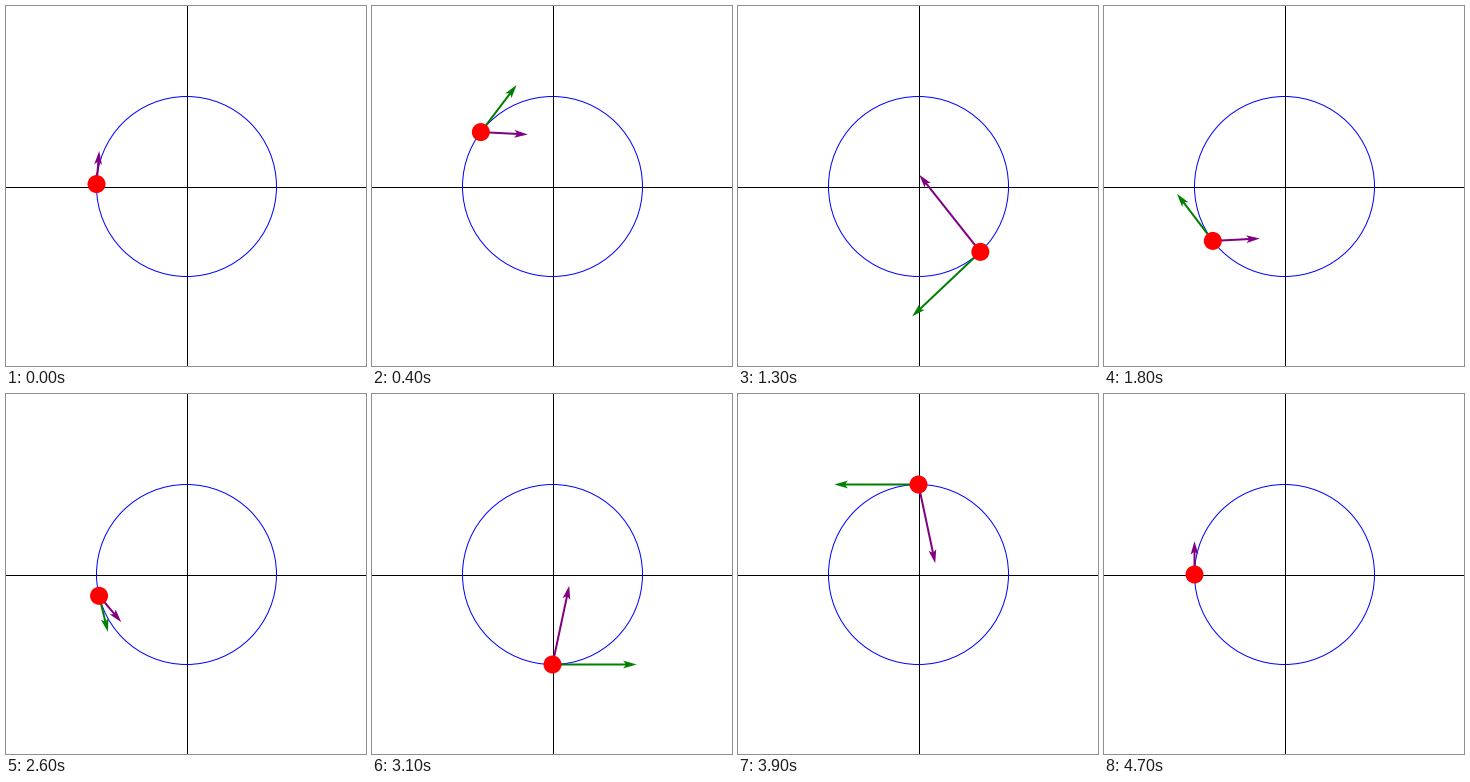
A matplotlib script for the animation above (4800 ms loop, 360x360 px).

```python
import numpy as np
import matplotlib.pyplot as plt
from matplotlib.animation import FuncAnimation
from matplotlib.patches import Circle, Polygon

SIZE, FRAMES, INTERVAL = 360, 48, 100
CENTER, RADIUS = 180.5, 90
SPEED = 1.08            # peak angular speed; the swing amplitude is pi
OMEGA = SPEED / np.pi

# Arrow outline relative to its tip, pointing along +x
HEAD, NOTCH, HALF_HEAD, HALF_SHAFT = 13.6, 11.2, 3.9, 1.0

fig = plt.figure(figsize=(SIZE / 72, SIZE / 72), dpi=72, facecolor="white")
ax = fig.add_axes([0, 0, 1, 1])
ax.set_xlim(-CENTER, SIZE - CENTER)
ax.set_ylim(CENTER - SIZE, CENTER)
ax.axis("off")

ax.axhline(0, color="black", lw=1, zorder=1)
ax.axvline(0, color="black", lw=1, zorder=1)
ax.add_patch(Circle((0, 0), RADIUS, fill=False, ec="blue", lw=1, zorder=2))


def make_arrow(color, zorder):
    arrow = Polygon(np.zeros((3, 2)), closed=True, fc=color, lw=0,
                    zorder=zorder, snap=False)
    return ax.add_patch(arrow)


velocity = make_arrow("green", 3)
acceleration = make_arrow("purple", 4)
ball = ax.add_patch(Circle((0, 0), 9, fc="red", lw=0, zorder=5))


def place_arrow(arrow, start, vec):
    length = np.hypot(*vec)
    arrow.set_visible(length > 1e-6)
    if length <= 1e-6:
        return
    along = vec / length
    across = np.array([-along[1], along[0]])
    notch = max(length - NOTCH, 0)
    back = length - HEAD
    outline = [(0, HALF_SHAFT), (notch, HALF_SHAFT), (back, HALF_HEAD),
               (length, 0),
               (back, -HALF_HEAD), (notch, -HALF_SHAFT), (0, -HALF_SHAFT)]
    arrow.set_xy([start + u * along + v * across for u, v in outline])


def update(i):
    phase = 2 * np.pi * (i + 1) / FRAMES
    theta = np.pi * np.cos(phase)
    rate = -SPEED * np.sin(phase)
    accel = -OMEGA ** 2 * theta
    radial = np.array([np.cos(theta), np.sin(theta)])
    tangent = np.array([-np.sin(theta), np.cos(theta)])

    pos = RADIUS * radial
    place_arrow(velocity, pos, RADIUS * rate * tangent)
    place_arrow(acceleration, pos,
                RADIUS * (accel * tangent - rate ** 2 * radial))
    ball.center = tuple(pos)
    return velocity, acceleration, ball


anim = FuncAnimation(fig, update, frames=FRAMES, interval=INTERVAL,
                     repeat=True, repeat_delay=0, blit=False)
plt.show()
```
